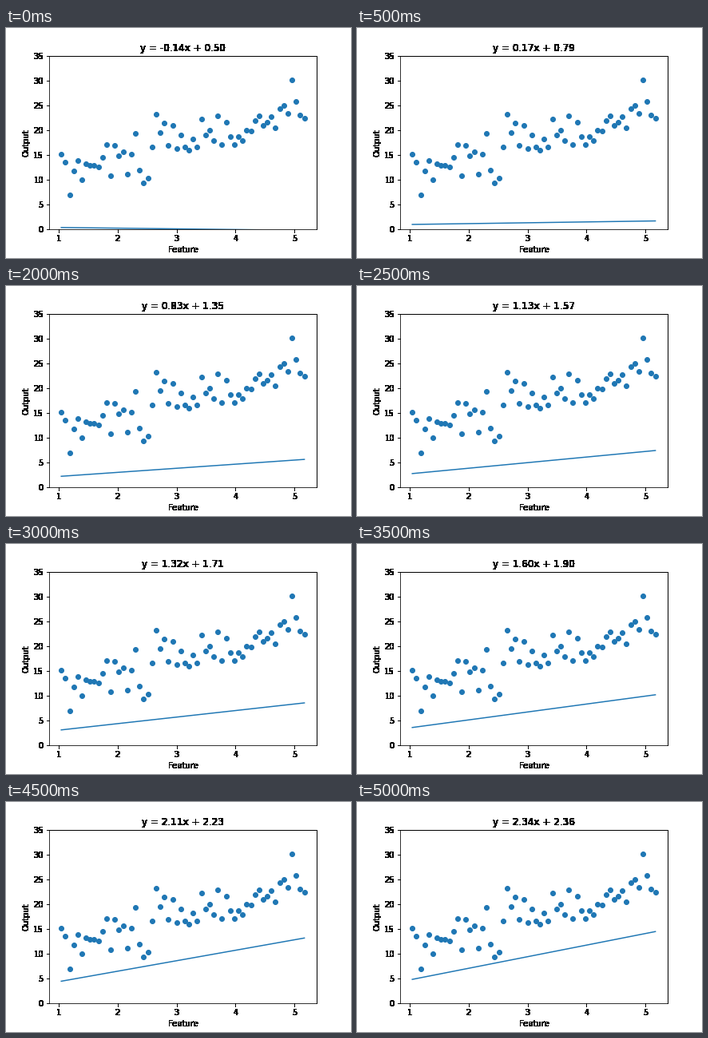
A matplotlib script for the animation above (5500 ms loop, 432 by 288 pixels).

```python
import numpy as np
import matplotlib.pyplot as plt
from matplotlib.animation import FuncAnimation

STEPS, STEP_MS = 11, 500
RATE = 0.01

# Noisy linear data
rng = np.random.RandomState(10)
x = np.radians(np.arange(60, 300, 4))
y = 3 * x + 8 + rng.normal(0, 3, x.size)


def descend(m, b):
    """Stochastic gradient descent, one sample per step."""
    fits = [(m, b)]
    for xi, yi in zip(x[:STEPS - 1], y):
        err = yi - (m * xi + b)
        m += 2 * RATE * err * xi
        b += 2 * RATE * err
        fits.append((m, b))
    return fits


def harden(img, dpi):
    """Turn every touched pixel fully opaque."""
    img = img.copy()
    img[..., 3] = img[..., 3] > 0
    return img, 0, 0


fits = descend(-0.138, 0.4955)

fig, ax = plt.subplots(figsize=(6, 4), dpi=72, facecolor="white")
fig.subplots_adjust(left=0.125, right=0.9, bottom=0.125, top=0.88)
ax.scatter(x, y, color="C0")
line, = ax.plot(x, x, color="C0")
pad = 0.05 * np.ptp(x)
ax.set_xlim(x[0] - pad, x[-1] + pad)
ax.set_ylim(0, 35)
ax.set_xticks(range(1, 6))
ax.set_yticks(range(0, 36, 5))
ax.set_xlabel("Feature")
ax.set_ylabel("Output")
title = ax.set_title("")

crisp = [title, ax.xaxis.label, ax.yaxis.label, ax.spines["top"], ax.spines["right"]]
for axis in (ax.xaxis, ax.yaxis):
    crisp += axis.get_ticklabels() + axis.get_ticklines()
for artist in crisp:
    artist.set_agg_filter(harden)


def update(i):
    m, b = fits[i]
    line.set_ydata(m * x + b)
    title.set_text(f"y = {m:.2f}x + {b:.2f}")
    return line, title


anim = FuncAnimation(fig, update, frames=STEPS, interval=STEP_MS,
                     repeat=True, repeat_delay=0, blit=False)
plt.show()
```
